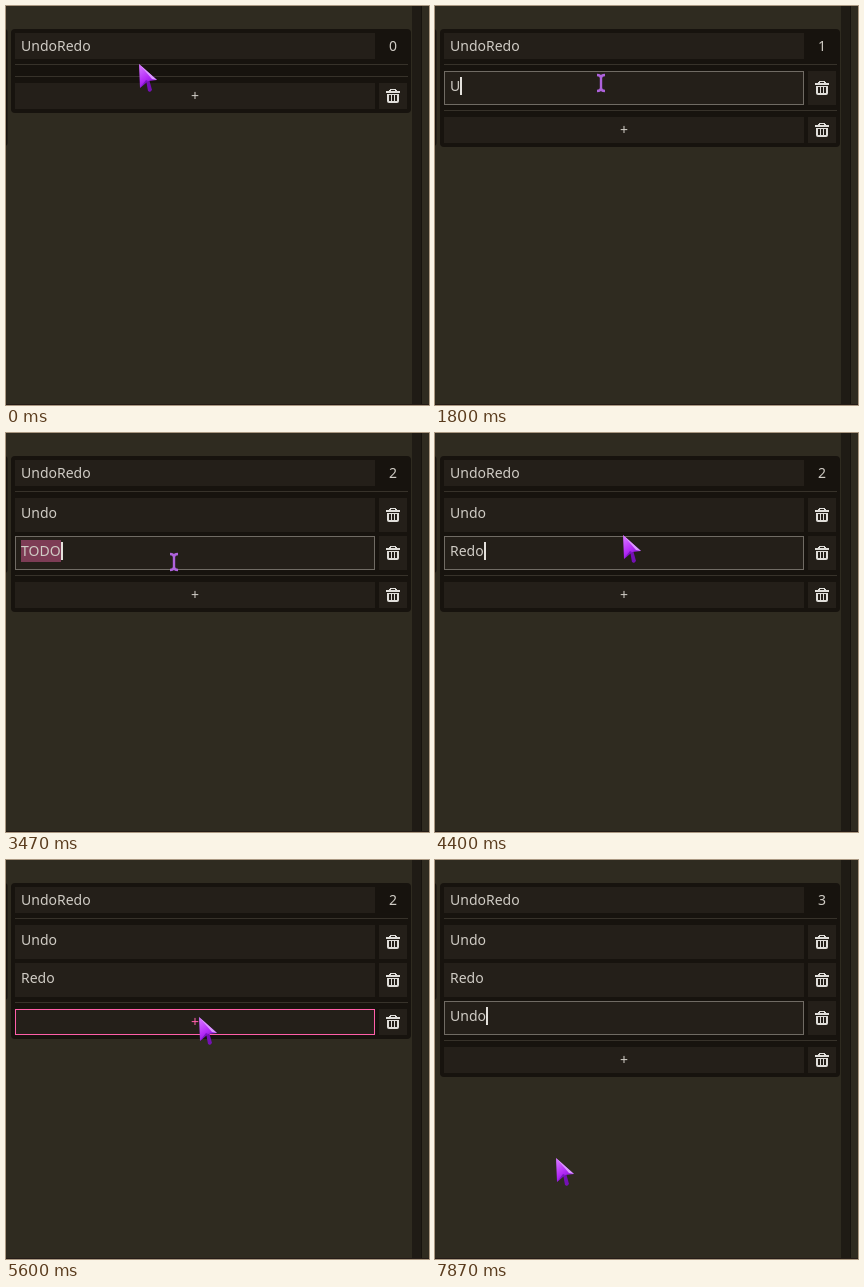
An HTML page with a canvas for the animation above (8000 ms loop, 423 by 399 pixels).

```html
<!DOCTYPE html>
<html lang="en">
<head>
<meta charset="utf-8">
<title>List editor</title>
<style>
  html, body { margin: 0; width: 100%; height: 100%; overflow: hidden; background: #2f2b20; }
  canvas { display: block; }
</style>
</head>
<body>
<canvas id="stage" width="423" height="399"></canvas>
<script>
const ctx = document.getElementById('stage').getContext('2d');
const LOOP = 8000;
const PLACEHOLDER = 'TODO';
const COLORS = {
  bg: '#2f2b20', panel: '#17130e', field: '#241f19', line: '#37322a', bar: '#1f1b15',
  text: '#d0ccc5', icon: '#e0deda', focus: '#706b64', accent: '#ff5fa9', selection: '#7d3c55'
};

// Each row: [time, text] edits, the first of which creates the row.
const ROWS = [
  [[870, PLACEHOLDER], [1800, 'U'], [2070, 'Un'], [2200, 'Und'], [2270, 'Undo']],
  [[3400, PLACEHOLDER], [3670, 'R'], [3800, 'Re'], [4200, 'Red'], [4400, 'Redo']],
  [[5670, PLACEHOLDER], [6330, 'U'], [6530, 'Un'], [6670, 'Und'], [6800, 'Undo']]
];

// Pointer moves: first step, last step, step count, destination.
const MOVES = [
  [130, 530, 7, 167, 77],
  [870, 870, 1, 166, 77],
  [3070, 3200, 3, 167, 130],
  [3470, 3470, 1, 168, 129],
  [3670, 3800, 3, 188, 102],
  [5200, 5600, 7, 193, 157],
  [7470, 7530, 2, 88, 309],
  [7870, 7870, 1, 121, 298]
];

const between = (t, from, to) => t >= from && t < to;
const rowTop = i => 65 + 38 * i;

function pointerAt(t) {
  let x = 133, y = 58;
  for (const [start, end, steps, toX, toY] of MOVES) {
    if (t < start) break;
    const gap = (end - start) / (steps - 1 || 1) || 1;
    const step = Math.min(steps, Math.floor((t - start + 4) / gap) + 1);
    const p = t >= end ? 1 : step / steps;
    const eased = p * p * (3 - 2 * p);
    x += (toX - x) * eased;
    y += (toY - y) * eased;
  }
  return { x: Math.round(x), y: Math.round(y) };
}

function rect(x, y, w, h, color) {
  ctx.fillStyle = color;
  ctx.fillRect(x, y, w, h);
}

function frame(x, y, w, h, color) {
  ctx.strokeStyle = color;
  ctx.lineWidth = 1;
  ctx.strokeRect(x + .5, y + .5, w - 1, h - 1);
}

function rounded(x, y, w, h, r, color) {
  ctx.fillStyle = color;
  ctx.beginPath();
  ctx.roundRect(x, y, w, h, r);
  ctx.fill();
}

function label(text, x, y, align = 'left', color = COLORS.text) {
  ctx.textAlign = align;
  ctx.fillStyle = color;
  ctx.fillText(text, x, y);
}

function polygon(points, fill) {
  ctx.fillStyle = fill;
  ctx.beginPath();
  points.forEach(([x, y]) => ctx.lineTo(x, y));
  ctx.closePath();
  ctx.fill();
}

function trashButton(y, h) {
  rect(373, y, 28, h, COLORS.field);
  const top = y + h / 2 - 7;
  rect(384, top, 6, 1, COLORS.icon);
  rect(383, top + 1, 2, 1, COLORS.icon);
  rect(389, top + 1, 2, 1, COLORS.icon);
  rect(380, top + 2, 14, 2, COLORS.icon);
  rounded(381, top + 5, 12, 9, [0, 0, 2, 2], COLORS.icon);
  for (const x of [383, 386, 389]) rect(x, top + 6, 2, 6, COLORS.field);
}

function drawRow(y, text, focused) {
  rect(9, y, 360, 34, COLORS.field);
  const width = ctx.measureText(text).width;
  if (focused) {
    frame(9, y, 360, 34, COLORS.focus);
    if (text === PLACEHOLDER) rect(15, y + 4, Math.round(width), 22, COLORS.selection);
  }
  label(text, 15, y + 20);
  if (focused) rect(15 + Math.round(width), y + 6, 2, 18, '#e4e1dc');
  trashButton(y, 34);
}

function drawAddButton(y, pressed) {
  rect(9, y, 360, 26, COLORS.field);
  if (pressed) frame(9, y, 360, 26, COLORS.accent);
  label('+', 189, y + 18, 'center', pressed ? COLORS.accent : COLORS.text);
  trashButton(y, 26);
}

function drawArrow() {
  const body = ctx.createLinearGradient(2, 3, 13, 20);
  body.addColorStop(0, '#d26cff');
  body.addColorStop(.6, '#b52cf8');
  body.addColorStop(1, '#8a16d6');
  polygon([[7, 16], [10, 15], [13, 26], [11, 28], [9, 27]], '#7410b4');
  polygon([[0, 0], [18, 16], [9, 17], [1, 24]], body);
  polygon([[0, 0], [18, 16], [13, 15]], '#dc9cff');
  polygon([[1, 24], [9, 17], [7, 16]], '#7b12c2');
}

function drawBeam() {
  ctx.strokeStyle = '#ae62dc';
  ctx.lineWidth = 2.4;
  ctx.beginPath();
  for (const s of [-1, 1]) {
    ctx.moveTo(-4, 8 * s);
    ctx.quadraticCurveTo(0, 8 * s, 0, 5 * s);
    ctx.quadraticCurveTo(0, 8 * s, 4, 8 * s);
  }
  ctx.moveTo(0, -7);
  ctx.lineTo(0, 7);
  ctx.stroke();
}

function drawPointer(t, count) {
  const { x, y } = pointerAt(t);
  let overField = false;
  for (let i = 0; i < count; i++) overField ||= between(y, rowTop(i), rowTop(i) + 34);
  ctx.save();
  ctx.translate(x, y);
  if (overField) drawBeam(); else drawArrow();
  ctx.restore();
}

function draw(t) {
  const rows = ROWS.filter(edits => t >= edits[0][0])
    .map(edits => edits.filter(([time]) => t >= time).pop()[1]);
  const count = rows.length;
  const separator = count ? 66 + 38 * count : 70;
  const pressed = between(t, 3200, 3400) || between(t, 5530, 5670);
  const blurred = between(t, 5530, 5670);

  rect(0, 0, 423, 399, COLORS.bg);
  rect(406, 0, 10, 399, COLORS.bar);
  rect(415, 0, 1, 399, '#17130e');
  rect(0, 398, 423, 1, '#241b16');
  rounded(-8, 23, 9.5, 117, 3, COLORS.panel);

  rounded(5, 23, 400, separator + 14, 4, COLORS.panel);
  ctx.font = '14px "Noto Sans", sans-serif';
  rect(9, 27, 360, 26, COLORS.field);
  label('UndoRedo', 15, 45);
  label(count, 387, 45, 'center');
  rect(9, 58, 393, 1, COLORS.line);
  rows.forEach((text, i) => drawRow(rowTop(i), text, i === count - 1 && !blurred));
  rect(9, separator, 393, 1, COLORS.line);
  drawAddButton(separator + 7, pressed);
  drawPointer(t, count);
}

function tick() {
  draw(performance.now() % LOOP);
  requestAnimationFrame(tick);
}
tick();
</script>
</body>
</html>
```
